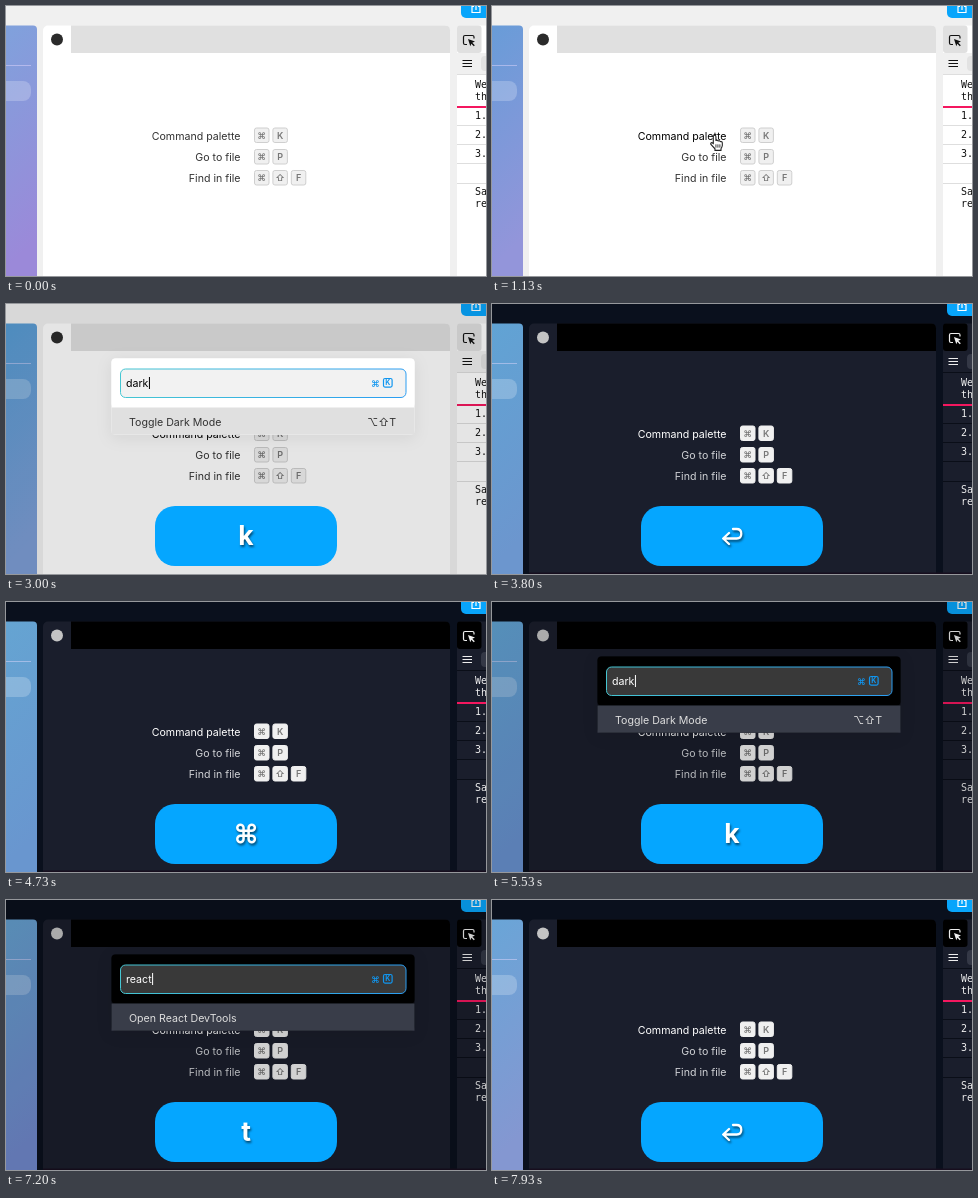
These frames come from a looping animation (480x270 px, 8 s). An HTML page:

```html
<!DOCTYPE html>
<html lang="en">
<head>
<meta charset="utf-8">
<title>Command palette</title>
<style>
html, body { margin: 0; width: 100%; height: 100%; overflow: hidden; }
svg { display: block; width: 100vw; height: 100vh; font: 10.62px Inter, "DejaVu Sans", sans-serif; }
.mono { font: 10px "DejaVu Sans Mono", monospace; }
.key { font-size: 9px; font-weight: 600; text-anchor: middle; }
.big { font-size: 26.5px; font-weight: 700; text-anchor: middle; }
.end { text-anchor: end; }
.lift { filter: drop-shadow(1px 2px 1px rgba(0, 0, 0, .55)); }
.modal { filter: drop-shadow(0 3px 8px rgba(0, 0, 0, .07)); }
</style>
</head>
<body>
<svg id="stage" viewBox="0 0 480 270" preserveAspectRatio="none"></svg>
<script>
const LOOP = 8000, CLICK = 1330, KEY_HOLD = 750, ROW = 27.2;
const stage = document.getElementById('stage');
const pen = document.createElement('canvas').getContext('2d');

const LIGHT = {
  page: '#f0f0f0', pane: '#fff', bar: '#e0e0e0', mark: '#2b2b2b', text: '#333', hover: '#000',
  cap: '#f0f0f0', capLine: '#cfcfcf', capText: '#777', shade: 'rgba(0,0,0,.1)',
  tool: '#e0e0e0', tools: '#f0f0f0', field: '#e2e2e2', rule: '#dedede', log: '#111',
  head: '#fff', list: '#fff', pick: '#e0e0e0', input: '#f2f2f2', item: '#333', hint: '#909090', thumb: '#adadad'
};
const DARK = {
  page: '#0a101d', pane: '#1a1e2c', bar: '#000', mark: '#c4c4c4', text: '#d0d2d6', hover: '#fff',
  cap: '#f0f0f0', capLine: '#f0f0f0', capText: '#777', shade: 'rgba(0,0,0,.13)',
  tool: '#000', tools: '#1a1e2c', field: '#343846', rule: '#0a0e18', log: '#eee',
  head: '#000', list: '#0b0d12', pick: '#393d49', input: '#393939', item: '#dedede', hint: '#8b8b8b', thumb: '#666'
};

const ITEMS = [
  ['Open Sources', ''], ['Search full text', '⌘⇧F'], ['Search for a function', '⌘O'],
  ['Search for file', '⌘P'], ['Open Console', ''], ['Open DevTools', ''],
  ['Open React DevTools', ''], ['Toggle Dark Mode', '⌥⇧T']
];

const typed = (word, start, step) => [...word].map((c, i) => [start + i * step, c]);
const KEYS = [
  ...typed('dark', 2530, 133), [3330, '↩'],
  [4600, '⌘'], [4870, 'k'],
  ...typed('dark', 5205, 100), ...typed('⌫⌫⌫⌫', 5800, 67),
  ...typed('react', 6770, 100), [7600, '↩']
];

// time, top and bottom colour of the preview panel
const SKY = [
  [0, [128, 161, 220], [155, 137, 217]],
  [2400, [80, 151, 212], [138, 163, 219]],
  [3800, [97, 163, 212], [108, 150, 206]],
  [4730, [101, 164, 210], [105, 150, 207]],
  [5530, [98, 164, 212], [104, 146, 208]],
  [7200, [101, 160, 208], [112, 137, 204]],
  [8000, [106, 166, 216], [134, 152, 210]]
];

const rect = (x, y, w, h, fill, r = 0, more = '') =>
  `<rect x="${x}" y="${y}" width="${w}" height="${h}" rx="${r}" fill="${fill}" ${more}/>`;
const text = (x, y, s, fill, cls = '') => `<text x="${x}" y="${y}" fill="${fill}" class="${cls}">${s}</text>`;
const line = (d, stroke, w = 1, more = '') =>
  `<path d="${d}" fill="none" stroke="${stroke}" stroke-width="${w}" ${more}/>`;
const clamp = v => Math.max(0, Math.min(1, v));
const easeOut = v => 1 - (1 - clamp(v)) ** 3;

function stateAt(t) {
  const s = { dark: false, open: t >= CLICK, openedAt: CLICK, query: '', key: '', keyAt: -1e4 };
  for (const [at, c] of KEYS) {
    if (at > t) break;
    s.key = c;
    s.keyAt = at;
    if (c === '↩') {
      if (s.query === 'dark') s.dark = !s.dark;
      s.open = false;
      s.query = '';
    } else if (c === '⌫') s.query = s.query.slice(0, -1);
    else if (s.open) s.query += c;
    else if (c === 'k') { s.open = true; s.openedAt = at; }
  }
  return s;
}

function preview(t) {
  const i = Math.max(1, SKY.findIndex(k => k[0] > t));
  const a = SKY[i - 1], b = SKY[i], p = (t - a[0]) / (b[0] - a[0]);
  const mix = n => `rgb(${a[n].map((v, j) => Math.round(v + (b[n][j] - v) * p))})`;
  return `<linearGradient id="sky" x1="0" y1="0" x2=".15" y2="1">
    <stop offset=".05" stop-color="${mix(1)}"/><stop offset=".95" stop-color="${mix(2)}"/></linearGradient>` +
    rect(-10, 19.5, 41, 260, 'url(#sky)', 4) +
    line('M0 59.5H25', 'rgba(235,220,255,.45)') +
    rect(-20, 75, 45, 20, 'rgba(255,255,255,.22)', 8);
}

function shortcut(y, label, keys, c, hovered) {
  const caps = [...keys].map((k, i) => {
    const x = 248.5 + i * 18.4;
    return rect(x, y - 7, 14.5, 14.5, c.cap, 2, `stroke="${c.capLine}"`) + text(x + 7.25, y + 3.5, k, c.capText, 'key');
  });
  return text(234.5, y + 4.7, label, hovered ? c.hover : c.text, 'end') + caps.join('');
}

function editor(c, hovered) {
  return rect(37, 19.5, 407, 260, c.pane, 5) +
    `<path d="M65 19.5H439Q444 19.5 444 24.5V47H65Z" fill="${c.bar}"/>` +
    `<circle cx="51" cy="33.5" r="6" fill="${c.mark}"/>` +
    shortcut(129, 'Command palette', '⌘K', c, hovered) +
    shortcut(150.5, 'Go to file', '⌘P', c) +
    shortcut(171.5, 'Find in file', '⌘⇧F', c);
}

function devtools(c) {
  const logs = [[82, 'We'], [94, 'th'], [113, '1.'], [132, '2.'], [151, '3.'], [189, 'Sa'], [201, 're']];
  return rect(451, 19.5, 40, 260, c.pane, 4) +
    rect(451, 19.5, 24.5, 27.5, c.tool, 3) +
    line('M461 38.5H459Q457.5 38.5 457.5 37V31Q457.5 29.5 459 29.5H466.5Q468 29.5 468 31V32.5', c.log, 1.2) +
    `<path d="M462 33L469 35.6L466.3 36.8L468.8 39.3L467.8 40.3L465.3 37.8L464.3 40.3Z" fill="${c.log}"/>` +
    rect(451, 47, 29, 21.5, c.tools) + rect(475, 50, 20, 15, c.field, 4) +
    line('M456.5 54.5H466M456.5 57.5H466M456.5 60.5H466', c.log, 1.2) +
    line('M451 68.5H480M451 119.5H480M451 138.5H480M451 157.5H480M451 177.5H480', c.rule) +
    line('M451 101H480', '#f4175f', 2) +
    logs.map(([y, s]) => text(469, y, s, c.log, 'mono')).join('');
}

function shareButton() {
  return rect(455, -20, 40, 32, '#08a5fb', 5) +
    line('M468 0.5H466V6.5H474V0.5H472M470 4V-4', '#fff', 1.2);
}

function palette(s, t, c) {
  const found = ITEMS.filter(i => i[0].toLowerCase().includes(s.query));
  const long = found.length > 6;
  const rows = found.map(([label, keys], i) => {
    const y = 103.5 + i * ROW;
    return (i ? '' : rect(105.5, y, 303, ROW, c.pick)) +
      text(123, y + 18, label, c.item) + text(long ? 384 : 390, y + 18, keys, c.item, 'end');
  });
  pen.font = '10.62px Inter, "DejaVu Sans", sans-serif';
  const caret = 120.5 + pen.measureText(s.query).width;
  const age = clamp((t - s.openedAt) / 200);
  const zoom = 1 + .01 * Math.sin(age * Math.PI) - .01 * (1 - age);
  return `<g class="modal" transform="translate(257 140) scale(${zoom}) translate(-257 -140)">
    <linearGradient id="ring"><stop stop-color="#45c6d2"/><stop offset="1" stop-color="#2b9df2"/></linearGradient>` +
    rect(105.5, 54.5, 303, 49 + found.length * ROW, c.list, 4) +
    rect(105.5, 54.5, 303, 49, c.head, 4) +
    rect(114.5, 65, 285.5, 28.5, c.input, 5, 'stroke="url(#ring)"') +
    text(120, 83, s.query || 'What would you like to do?', s.query ? c.hover : c.hint) +
    (s.query ? rect(caret, 73, 1, 12, c.hover) : '') +
    text(369.5, 82.5, '⌘', '#1096f0', 'key') +
    rect(377.5, 74.5, 8.6, 8.6, 'none', 1.5, 'stroke="#1096f0" stroke-width="1.2"') +
    `<text x="381.8" y="81.4" fill="#1096f0" font-size="7" font-weight="700" text-anchor="middle">K</text>` +
    rows.join('') +
    (long ? rect(403, 104, 6, 58.5, c.thumb, 3) : '') + '</g>';
}

function keyCard(s, t) {
  const alpha = 1 - clamp((t - s.keyAt - KEY_HOLD) / 130);
  if (!alpha) return '';
  const face = s.key === '↩'
    ? line('M241 225H244.5Q249.3 225 249.3 229.8T244.5 234.5H231.5M237 229L231.2 234.5L237 240', '#fff', 2.3,
      'class="lift" stroke-linecap="round" stroke-linejoin="round"')
    : text(240, 241.3, s.key, '#fff', 'big lift');
  return `<g opacity="${alpha}">${rect(149, 202, 182, 60, '#05a6ff', 20)}${face}</g>`;
}

function pointer(t) {
  if (t < 250 || t >= KEYS[0][0]) return '';
  const p = easeOut((t - 250) / 600);
  return `<g transform="translate(${200 + 18 * p} ${285 - 156 * p}) scale(1.1)" fill="#fff" stroke="#222" stroke-linejoin="round">
    <path d="M3 8V1.5Q3 .2 4.2 .2T5.4 1.5V5Q6.8 4.2 7.4 5.4Q8.8 4.8 9.3 6Q11.2 5.6 11.2 7.5V9.5Q11 11 10 12.5V14H4.5V12.5L1 8.8Q.2 7.5 1.2 7T3 8Z"/>
    ${line('M5.4 8.5V11.5M7.2 8.5V11.5M9 8.5V11.5', '#222', .8)}</g>`;
}

function draw(t) {
  const s = stateAt(t), c = s.dark ? DARK : LIGHT;
  stage.innerHTML =
    rect(0, 0, 480, 270, c.page) + preview(t) + editor(c, t > 700) + devtools(c) + shareButton() +
    (s.dark ? rect(37, 268.5, 443, 1.5, '#170e1e') : '') +
    (s.open ? rect(0, 0, 480, 270, c.shade) + palette(s, t, c) : '') +
    keyCard(s, t) + pointer(t);
}

const began = performance.now();
function tick() {
  draw((performance.now() - began) % LOOP);
  requestAnimationFrame(tick);
}
tick();
</script>
</body>
</html>
```
